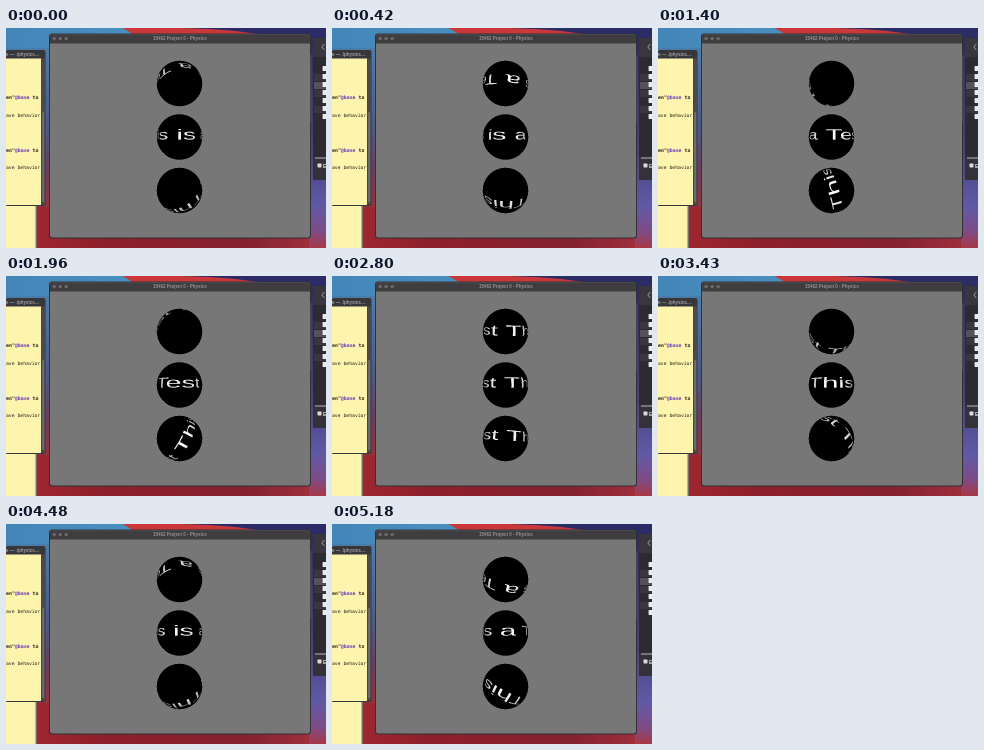
Animation, 320 px wide and 220 px high, one loop 5.25 s. Source, as an HTML page with a canvas:

```html
<!DOCTYPE html>
<html lang="en">
<head>
<meta charset="utf-8">
<title>Rolling text spheres</title>
<style>
  html, body { margin: 0; width: 320px; height: 220px; overflow: hidden; background: #42639f; }
  svg, canvas { position: absolute; left: 0; top: 0; display: block; }
  .ui { font-family: "Liberation Sans", Arial, sans-serif; font-weight: bold; }
  .code { font: bold 4.9px "DejaVu Sans Mono", monospace; fill: #24231c; white-space: pre; }
  .plain { font-weight: normal; font-size: 4.75px; }
  .key { fill: #6a38b8; }
</style>
</head>
<body>
<svg width="320" height="220" viewBox="0 0 320 220">
  <defs>
    <linearGradient id="sky">
      <stop offset="0" stop-color="#4585b8"/>
      <stop offset="1" stop-color="#4a9fca"/>
    </linearGradient>
    <linearGradient id="ground">
      <stop offset="0" stop-color="#a52a34"/>
      <stop offset=".3" stop-color="#8e1f2a"/>
      <stop offset=".75" stop-color="#84222f"/>
      <stop offset="1" stop-color="#a5323f"/>
    </linearGradient>
    <linearGradient id="gap" x2="0" y2="1">
      <stop offset="0" stop-color="#4a7cab"/>
      <stop offset=".5" stop-color="#4a5a8a"/>
      <stop offset=".75" stop-color="#6b3e5e"/>
      <stop offset="1" stop-color="#98303e"/>
    </linearGradient>
    <linearGradient id="edge" x2="0" y2="1">
      <stop offset="0" stop-color="#2b2c5e"/>
      <stop offset=".55" stop-color="#46447f"/>
      <stop offset=".8" stop-color="#6059a6"/>
      <stop offset=".92" stop-color="#7d4c86"/>
      <stop offset="1" stop-color="#a83846"/>
    </linearGradient>
    <g id="lines" class="code">
      <text x="0" y="71">en"<tspan class="key">@base</tspan> to</text>
      <text class="plain" x="0" y="88.5">ave behavior</text>
    </g>
  </defs>

  <rect width="320" height="120" fill="url(#sky)"/>
  <path d="M116 0 Q126 4 132 12 H290 V0 z" fill="#cb3839"/>
  <path d="M175 0 Q235 1 272 10 H320 V0 z" fill="#2b2c66"/>
  <rect y="20" width="46" height="160" fill="url(#gap)"/>
  <rect y="179" width="320" height="41" fill="url(#ground)"/>
  <rect x="303" y="9" width="17" height="211" fill="url(#edge)"/>

  <rect y="176" width="31" height="44" fill="#77716b"/>
  <rect y="178" width="29.5" height="42" fill="#fdf4ad"/>
  <rect y="22" width="39.5" height="156" rx="2" fill="#37363a"/>
  <rect y="30.5" width="35" height="146.5" fill="#fdf4ad"/>
  <rect x="35.2" y="30.5" width="3.8" height="146" fill="#4c4a4c"/>
  <rect x="36.2" y="84" width="1.9" height="90" rx="1" fill="#706e72"/>
  <text class="ui" x="0" y="28" font-size="4.5" fill="#a09ea2">e — ./physics…</text>
  <use href="#lines"/>
  <use href="#lines" y="52.5"/>

  <rect x="307" y="10" width="16" height="142" rx="2" fill="#2d2a32"/>
  <rect x="307" y="10" width="13" height="19" fill="#3a3640"/>
  <path d="M318.3 16 l-2.5 3 l2.5 3" fill="none" stroke="#aaa8ad" stroke-width=".9"/>
  <g fill="#39363e">
    <rect x="308" y="46" width="12" height="7"/>
    <rect x="308" y="62" width="12" height="7"/>
    <rect x="308" y="78" width="12" height="7"/>
  </g>
  <rect x="308" y="54" width="12" height="7" fill="#545158"/>
  <path d="M318.3 38 v53" stroke="#ececec" stroke-width="3.4" stroke-dasharray="5 3"/>
  <rect x="307" y="129" width="13" height="23" fill="#34313a"/>
  <rect x="309" y="129.3" width="11" height="1.4" fill="#918e96"/>
  <rect x="311.5" y="135.5" width="4" height="4" rx=".7" fill="#d9d9da"/>
  <text class="ui" x="317" y="139.5" font-size="5" fill="#d9d9da">E</text>

  <rect x="43" y="5.5" width="262" height="205" rx="3" fill="#333036"/>
  <rect x="44" y="6.5" width="260" height="203" rx="2.5" fill="#777"/>
  <path d="M44 15.5 V9 q0 -2.5 2.5 -2.5 h255 q2.5 0 2.5 2.5 v6.5 z" fill="#403d41"/>
  <g fill="#69676b">
    <circle cx="48.2" cy="10.6" r="1.8"/>
    <circle cx="54.2" cy="10.6" r="1.8"/>
    <circle cx="60.2" cy="10.6" r="1.8"/>
  </g>
  <text class="ui" x="174" y="12.2" font-size="4.5" fill="#929094" text-anchor="middle">15462 Project 0 - Physics</text>
  <path d="M304.9 27 V94" stroke="#48474b" stroke-width="1.6"/>
</svg>
<canvas id="stage" width="320" height="220"></canvas>

<script>
const LOOP = 5250, STEP = 70, TURN = 4400, FACING = 2755;
const R = 22.7, BOX = 48, SUB = 3;
const EYE = 4; // distance of the eye from each centre, in radii
const TEX_W = 600, TEX_H = 80, PER_RAD = TEX_W / (2 * Math.PI);

const unit = v => v.map(c => c / Math.hypot(...v));
const spheres = [
  { x: 173.5, y: 55.5, axis: unit([.94, -.08, -.34]) },
  { x: 173.5, y: 109, axis: [0, -1, 0] },
  { x: 173.5, y: 162.5, axis: unit([-.45, .22, -.87]) }
];

// One line of text that goes once round the equator.
function makeTexture() {
  const c = document.createElement('canvas');
  c.width = TEX_W;
  c.height = TEX_H;
  const g = c.getContext('2d', { willReadFrequently: true });
  g.scale(1.97, 1);
  g.font = '50px "Liberation Sans", Arial, sans-serif';
  g.fillStyle = '#fff';
  g.fillText('This is a Test', 0, 49);
  const { data } = g.getImageData(0, 0, TEX_W, TEX_H);
  return (u, v) => {
    const y = Math.floor(v);
    if (y < 0 || y >= TEX_H) return 0;
    const x = (Math.floor(u) + TEX_W) % TEX_W;
    return data[(y * TEX_W + x) * 4 + 3];
  };
}

function rotation([x, y, z], angle) {
  const c = Math.cos(angle), s = Math.sin(angle), k = 1 - c;
  return [
    c + x * x * k, x * y * k - z * s, x * z * k + y * s,
    y * x * k + z * s, c + y * y * k, y * z * k - x * s,
    z * x * k - y * s, z * y * k + x * s, c + z * z * k
  ];
}

const ctx = document.getElementById('stage').getContext('2d');
const texel = makeTexture();
const tile = document.createElement('canvas');
tile.width = tile.height = BOX;
const tileCtx = tile.getContext('2d');
const image = tileCtx.createImageData(BOX, BOX);

// Where the eye's ray through a point of the unit outline meets the sphere.
function hit(px, py) {
  const f = Math.sqrt(EYE * EYE - 1);
  const a = (px * px + py * py) / (f * f);
  const root = 1 - a * (EYE * EYE - 1);
  if (root < 0) return null;
  const way = (EYE - Math.sqrt(root)) / (1 + a);
  return [px / f * way, py / f * way, EYE - way];
}

function drawSphere({ x: cx, y: cy, axis }, angle) {
  const m = rotation(axis, -angle);
  const left = Math.floor(cx - BOX / 2), top = Math.floor(cy - BOX / 2);
  for (let j = 0; j < BOX; j++) for (let i = 0; i < BOX; i++) {
    let light = 0, hits = 0;
    for (let k = 0; k < SUB * SUB; k++) {
      const px = (left + i + (k % SUB + .5) / SUB - cx) / R;
      const py = (cy - top - j - (Math.floor(k / SUB) + .5) / SUB) / R;
      const point = hit(px, py);
      if (!point) continue;
      hits++;
      const [x, y, z] = point;
      const lat = Math.asin(m[3] * x + m[4] * y + m[5] * z);
      if (Math.abs(lat) > .45) continue;
      const lon = Math.atan2(m[0] * x + m[1] * y + m[2] * z, m[6] * x + m[7] * y + m[8] * z);
      light += texel(lon * PER_RAD, TEX_H / 2 - lat * PER_RAD) * Math.min(1, .15 + .85 * z);
    }
    const p = (j * BOX + i) * 4;
    image.data.fill(hits ? light / hits : 0, p, p + 3);
    image.data[p + 3] = 255 * hits / (SUB * SUB);
  }
  tileCtx.putImageData(image, 0, 0);
  ctx.drawImage(tile, left, top);
}

let shown = -1;
function draw() {
  const t = Math.floor(performance.now() % LOOP / STEP) * STEP;
  if (t !== shown) {
    shown = t;
    ctx.clearRect(0, 0, 320, 220);
    const angle = (t - FACING) / TURN * 2 * Math.PI;
    spheres.forEach(s => drawSphere(s, angle));
  }
  requestAnimationFrame(draw);
}
draw();
</script>
</body>
</html>
```
